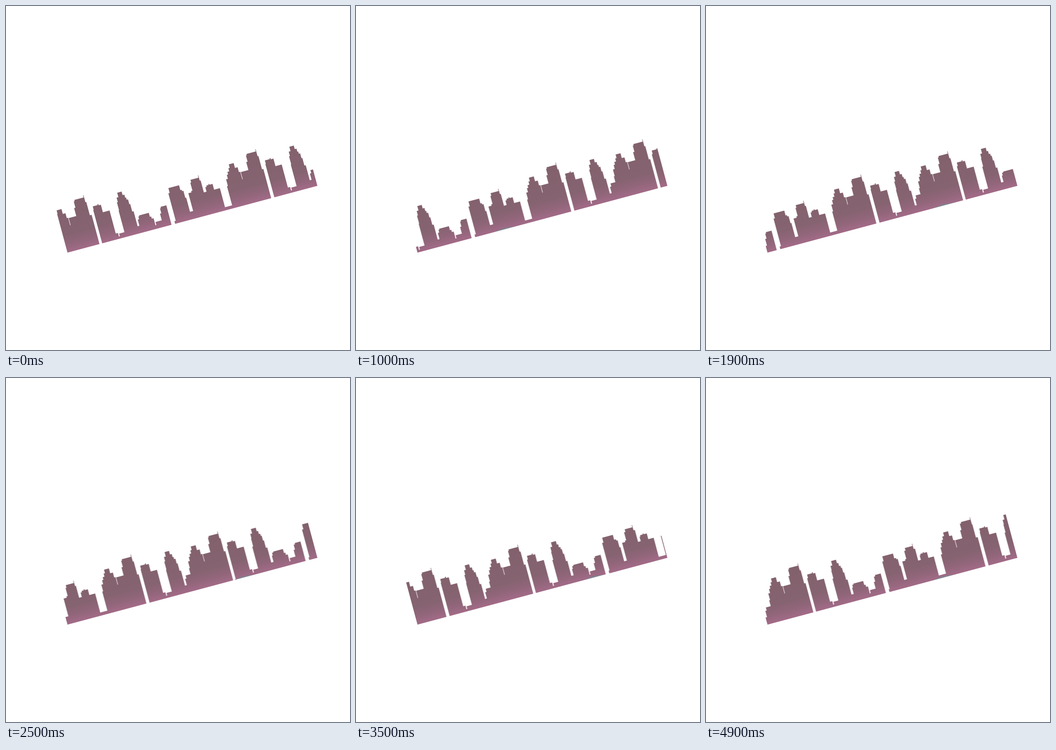
Recreate the animation shown at these times as an HTML page without scripts. Size 747x749 px, loop 5 s.

```html
<!DOCTYPE html>
<html lang="en">
<head>
<meta charset="utf-8">
<title>Skyline</title>
<style>
  html, body { margin: 0; width: 100%; height: 100%; overflow: hidden; background: #fff; }
  svg { display: block; width: 100%; height: 100%; }
  .strip { animation: scroll 5s steps(50) infinite; }
  .glint { animation: glide 5s infinite; }
  @keyframes scroll {
    to { transform: translateX(-561px); }
  }
  @keyframes glide {
    0% { transform: translateX(-105px); animation-timing-function: steps(17); }
    34% { transform: translateX(366px); animation-timing-function: step-end; }
    36%, 100% { transform: translateX(373px); }
  }
</style>
</head>
<body>
<svg viewBox="0 0 747 749" shape-rendering="crispEdges">
  <defs>
    <linearGradient id="dusk" gradientUnits="userSpaceOnUse" x1="0" y1="0" x2="0" y2="110">
      <stop offset="0" stop-color="#a36b88"/>
      <stop offset=".16" stop-color="#92667b"/>
      <stop offset=".36" stop-color="#856370"/>
      <stop offset="1" stop-color="#82616d"/>
    </linearGradient>
    <clipPath id="window"><rect width="561.5" height="130"/></clipPath>

    <path id="twins" d="M77.6 0V75H79V82.5H90V84.5H92V82H97.4V65H112.2V13H117V5H119V10.5H130.5V60H132V78H133.5V88H137.5V97.5H148V90H151.5V83H154V78H156.5V67H158.5V50H161.5V15.5H165.5V0Z"/>
    <path id="low" d="M165 0V15.5H166V30H168.5V35.5H171V37.5H193V29H196V23.5H199.8V7.5H202V14.5H215.5V30H218.5V41H221V44H234V0Z"/>
    <path id="mid" d="M242 0V6H244.5V68H247.5V79H271.7V68H275V64.5H278V49H280V17H286.5V57H293.5V60H296.5V78H299V83.5H316.5V89H317.5V77H320V50H326V60H328.5V62.5H334V65H336V63H343V50H355.5V6.5H371V0Z"/>
    <path id="high" d="M370 0V6.5H371.5V50H374V65H377.5V74H381V80H384.5V87H387.8V95H398.9V84H405V73H407.8V56H409V72H425.5V90H428.5V104H431V107H452V112H453V96H454.5V66H458.4V0Z"/>
    <path id="step" d="M549 0V15.5H553V30H556V37H572V0Z"/>

    <g id="city">
      <use href="#twins"/>
      <use href="#low"/>
      <use href="#mid"/>
      <use href="#high"/>
      <use href="#twins" x="387.2"/>
      <use href="#step"/>
      <use href="#high" x="195"/>
    </g>
  </defs>

  <!-- Upward y axis along the tilted ground line -->
  <g transform="translate(133.5 537) rotate(-15) scale(1 -1)">
    <g clip-path="url(#window)">
      <g class="strip" fill="url(#dusk)">
        <use href="#city" x="-581.7"/>
        <use href="#city"/>
        <use href="#city" x="581.7"/>
      </g>
      <path class="glint" d="M0 0Q23 6 46 0Z" fill="#80808f"/>
    </g>
  </g>
</svg>
</body>
</html>
```
